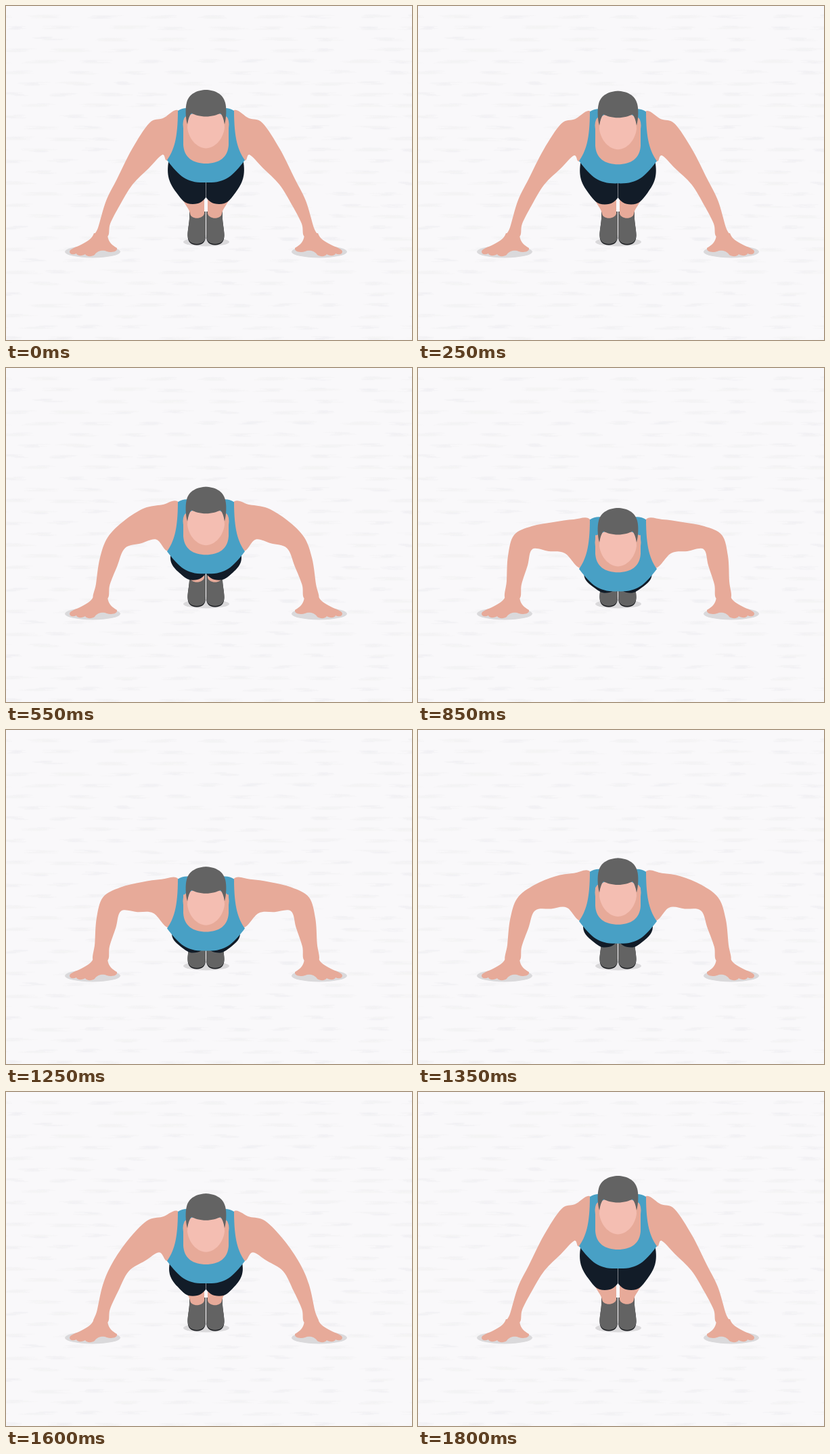
Animation, 600 px wide and 494 px high, one loop 2 s. Source, as an HTML page with a canvas:

```html
<!DOCTYPE html>
<html lang="en">
<head>
<meta charset="utf-8">
<title>Push-up</title>
<style>
html, body { margin: 0; width: 100%; height: 100%; overflow: hidden; background: #f9f8fa; }
canvas { display: block; }
</style>
</head>
<body>
<canvas id="stage" width="600" height="494"></canvas>
<script>
const ctx = document.getElementById('stage').getContext('2d');
const LOOP = 2000, STEP = 50, DEPTH = 83;
const WIDTH = 591; // the figure mirrors about x = WIDTH / 2
const SKIN = '#e7aa99', FACE = '#f4beb2', BLUE = '#48a0c5', NAVY = '#121c28',
      GREY = '#636363', DARK = '#17191d', SHADOW = '#dad9db';

// Left arm outline from shoulder to wrist to armpit: [x, y] raised, [x, y] lowered
const arm = [
  [255, 155, 255, 225], [232, 166, 230, 224], [212, 173, 200, 228], [186, 212, 168, 234],
  [164, 256, 142, 247], [148, 288, 133, 278], [136, 328, 131, 315], [130, 341, 129, 341],
  [150, 341, 150, 341], [154, 322, 153, 320], [168, 295, 162, 292], [187, 264, 169, 268],
  [211, 240, 193, 271], [231, 220, 217, 274], [239, 228, 241, 296], [262, 200, 262, 268]
];

const hand = new Path2D('M130 336C127 345 120 348 111 353C103 357 95 359 94 363C94 368 100 368 104 366' +
  'C105 370 113 370 117 367C119 371 127 371 131 368C136 361 144 361 149 363C155 365 165 364 164 358C158 354 150 350 150 336Z');
const shoe = new Path2D('M271 304C272 318 268.5 328 268.5 338C268.5 347 273 352 282 352C291 352 295 347 295 338V304Z');
const leg = new Path2D('M258 280C264 294 271 300 272 307C273 316 291 316 293 307V280Z');
const shirt = new Path2D('M254 155Q260 151 267 151H296V261C268 262 258 254 238 228C248 214 254 196 254 155Z');
const neck = new Path2D('M262 178V205C263 224 276 233 296 233V178Z');
const face = new Path2D('M269 165Q270 158 296 155V210.5C282 210 270 197 268 180Z');
const hair = new Path2D('M268 175C265 165 265 150 267 143C270 130 283 124 296 124V163.5C286 163.5 279 161 274 158.5Q270 163 268 175Z');

const phase = (t, from, to) => Math.min(1, Math.max(0, (t - from) / (to - from)));
const smoothstep = u => u * u * (3 - 2 * u);

// How far the head has sunk, in pixels
function dropAt(t) {
  return DEPTH * (smoothstep(phase(t, 200, 800)) - phase(t, 1200, 1750) ** 1.2);
}

// Closed curve through points
function curve(points) {
  const path = new Path2D(), n = points.length;
  const at = i => points[(i + n) % n];
  path.moveTo(...at(0));
  for (let i = 0; i < n; i++) {
    const [p, q, r, s] = [at(i - 1), at(i), at(i + 1), at(i + 2)];
    path.bezierCurveTo(q[0] + (r[0] - p[0]) / 6, q[1] + (r[1] - p[1]) / 6,
                       r[0] - (s[0] - q[0]) / 6, r[1] - (s[1] - q[1]) / 6, ...r);
  }
  return path;
}

function armAt(drop) {
  const u = drop / DEPTH;
  return curve(arm.map(([x0, y0, x1, y1]) => [x0 + (x1 - x0) * u, y0 + (y1 - y0) * u]));
}

function shortsAt(drop) {
  const top = 228 + 0.83 * drop, low = 293 + 0.27 * drop + 0.0025 * drop * drop;
  const x = 238.5 + 0.075 * drop, h = low - top;
  return new Path2D(`M${x + 2} ${top}C${x - 2} ${top + h * 0.35} ${x + 3} ${top + h * 0.52} ${x + 13} ${top + h * 0.73}` +
    `C${x + 22} ${top + h * 0.92} ${x + 26} ${low} 276 ${low}C286 ${low} 291 ${low - 4} 295.3 ${low - 10}V${top}Z`);
}

function ellipse(x, y, rx, ry) {
  const path = new Path2D();
  path.ellipse(x, y, rx, ry, 0, 0, Math.PI * 2);
  return path;
}

function fill(path, color, dy = 0) {
  ctx.save();
  ctx.translate(0, dy);
  ctx.fillStyle = color;
  ctx.fill(path);
  ctx.restore();
}

// Faint brushed dashes, staggered row by row
function paintWall() {
  let seed = 7;
  const rnd = () => (seed = seed * 16807 % 2147483647) / 2147483647;
  const wall = document.createElement('canvas');
  wall.width = 600;
  wall.height = 494;
  const g = wall.getContext('2d');
  g.fillStyle = '#f9f8fa';
  g.fillRect(0, 0, 600, 494);
  g.fillStyle = 'rgba(228,228,230,.17)';
  for (let row = 0; row < 30; row++) {
    for (let x = -60 + row % 2 * 40; x < 600; x += 62 + rnd() * 28) {
      const y = 13 + row * 16.4 + rnd() * 2, w = 35 + rnd() * 30;
      for (let k = 0; k < 5; k++) {
        g.beginPath();
        g.ellipse(x + w / 2 + rnd() * 20, y + k, w / 2 * (0.4 + rnd() * 0.6), 1, 0, 0, 7);
        g.fill();
      }
    }
  }
  return wall;
}

function drawHalf(drop) {
  const body = 0.835 * drop;
  fill(ellipse(128, 363.5, 41, 9), SHADOW);
  fill(shoe, DARK, 1.5);
  fill(shoe, GREY);
  fill(leg, SKIN, 0.06 * drop);
  fill(shortsAt(drop), NAVY);
  fill(armAt(drop), SKIN);
  fill(hand, SKIN);
  fill(shirt, BLUE, body);
  fill(neck, SKIN, body);
  fill(ellipse(267, 175, 5.5, 12), SKIN, drop);
  fill(face, FACE, drop);
  fill(hair, GREY, drop);
}

const wall = paintWall();

function draw(now) {
  const drop = dropAt(Math.floor(now % LOOP / STEP) * STEP);
  ctx.drawImage(wall, 0, 0);
  fill(ellipse(296, 349, 34, 6.5), SHADOW);
  for (const side of [1, -1]) {
    ctx.setTransform(side, 0, 0, 1, side < 0 ? WIDTH : 0, 0);
    drawHalf(drop);
  }
  ctx.setTransform(1, 0, 0, 1, 0, 0);
}

let start;
function tick(now) {
  start ??= now;
  draw(now - start);
  requestAnimationFrame(tick);
}
draw(0);
requestAnimationFrame(tick);
</script>
</body>
</html>
```
